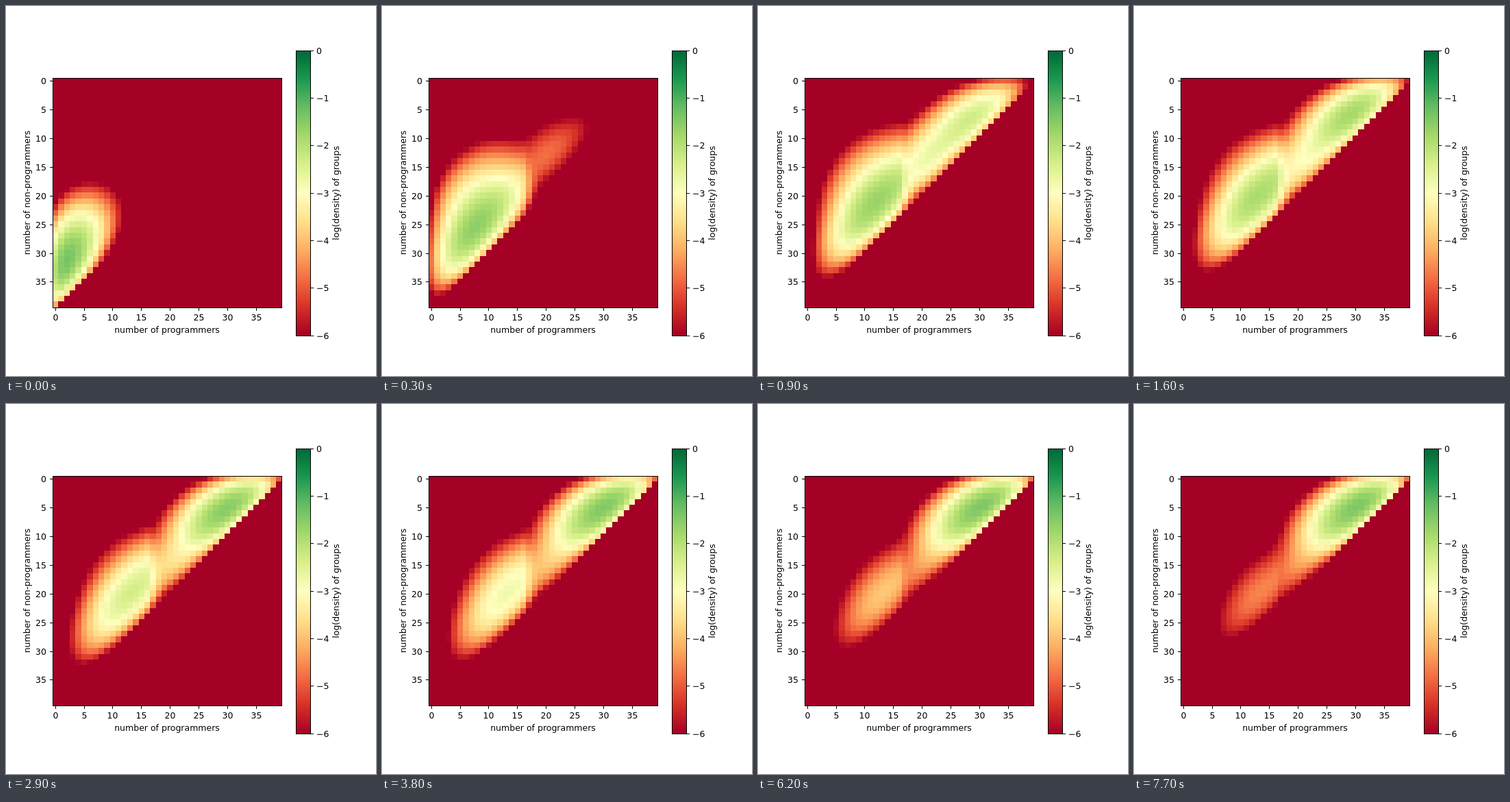
An HTML page with a canvas for the animation above (8000 ms loop, 540 by 540 pixels).

```html
<!DOCTYPE html>
<html>
<head>
<meta charset="utf-8">
<style>
html, body { margin: 0; width: 100%; height: 100%; overflow: hidden; background: #fff; }
canvas { display: block; }
</style>
</head>
<body>
<canvas id="c" width="540" height="540"></canvas>
<script>
const g = document.getElementById('c').getContext('2d');
const N = 39, CELL = 8.37, LOOP = 8000;

// Red-yellow-green colour scale for log densities -6 to 0
const stops = ['a50026', 'd73027', 'f46d43', 'fdae61', 'fee08b', 'ffffbf',
  'd9ef8b', 'a6d96a', '66bd63', '1a9850', '006837'];
const rgb = stops.map(h => [0, 2, 4].map(i => parseInt(h.slice(i, i + 2), 16)));
function color(v) {
  const s = Math.max(0, Math.min(9.999, (v + 6) / 0.6)), i = Math.floor(s);
  return `rgb(${rgb[i].map((a, k) => Math.round(a + (rgb[i + 1][k] - a) * (s - i)))})`;
}

const logFact = [0];
for (let i = 1; i <= N; i++) logFact[i] = logFact[i - 1] + Math.log10(i);

// Multinomial density of groups around a mean composition (mx, my, rest empty)
function cluster(weight, mx, my) {
  const [lx, ly, le] = [mx, my, N - mx - my].map(m => Math.log10(m / N));
  return (x, y, e) => weight * 10 ** (logFact[N] - logFact[x] - logFact[y] - logFact[e]
    + x * lx + y * ly + e * le);
}

// The low cluster settles, then drains over a bridge into the high one
function densityAt(t) {
  const k = Math.exp(-2.4 * t), slow = Math.exp(-0.9 * t), rise = 10 ** (-20 * k ** 3);
  const s = 4 * Math.exp(-1.08 * t), left = s / Math.hypot(1, s);
  const mx = 13.3 - 10.8 * k, my = 19.5 + 11 * k;
  const low = cluster(left, mx, my);
  const loose = cluster(left * (0.3 * k * (1 - k) + 0.008 * (1 - k)), mx * 0.88, my * 0.88);
  const bridge = cluster((0.18 * Math.exp(-t) + 0.002) * rise, 22 - 5 * k, 12.5 + k);
  const high = cluster((1 - left) * rise ** 2, 29.5 - 4 * slow, 5.2 + 4 * slow);
  return (x, y) => {
    const e = N - x - y, cut = 10 ** (-0.45 * Math.max(0, x - 16));
    return Math.log10((low(x, y, e) + loose(x, y, e)) * cut + bridge(x, y, e) + high(x, y, e));
  };
}

const edgeX = i => Math.ceil(67.5 + CELL * i);
const edgeY = i => Math.round(105.05 + CELL * i);

function heatmap(t) {
  const density = densityAt(t);
  g.fillStyle = color(-6);
  g.fillRect(68, 105, 335, 336);
  for (let y = 0; y <= N; y++) {
    for (let x = 0; x + y <= N; x++) {
      g.fillStyle = color(density(x, y));
      g.fillRect(edgeX(x), edgeY(y), edgeX(x + 1) - edgeX(x), edgeY(y + 1) - edgeY(y));
    }
  }
}

function text(s, x, y, align, turn) {
  g.save();
  g.translate(x, y);
  if (turn) g.rotate(-Math.PI / 2);
  g.textAlign = align;
  g.fillText(s, 0, 0);
  g.restore();
}
function line(x1, y1, x2, y2) {
  g.beginPath();
  g.moveTo(x1, y1);
  g.lineTo(x2, y2);
  g.stroke();
}

function axes() {
  g.font = '12.5px "DejaVu Sans", sans-serif';
  g.fillStyle = g.strokeStyle = '#000';
  g.lineWidth = 1;
  g.strokeRect(68.5, 105.5, 334, 335);
  for (let i = 0; i < 40; i += 5) {
    const x = Math.round(71.7 + CELL * i) + 0.5, y = Math.round(109.48 + CELL * i) + 0.5;
    line(x, 441, x, 445);
    text(i, x, 459, 'center');
    line(68, y, 64, y);
    text(i, 59, y + 4.5, 'right');
  }
  text('number of programmers', 235, 477, 'center');
  text('number of non-programmers', 35, 272.5, 'center', true);

  const bar = g.createLinearGradient(0, 481, 0, 65);
  stops.forEach((c, i) => bar.addColorStop(i / 10, '#' + c));
  g.fillStyle = bar;
  g.fillRect(423, 65, 21, 416);
  g.strokeRect(423.5, 65.5, 21, 416);
  g.fillStyle = '#000';
  for (let i = 0; i <= 6; i++) {
    const y = Math.round(64.8 + 69.3 * i) + 0.5;
    line(445, y, 449, y);
    text(i ? '\u2212' + i : '0', 453, y + 4.5, 'left');
  }
  text('log(density) of groups', 486, 273, 'center', true);
}

const start = performance.now();
let shown = -1;
function frame() {
  const t = (performance.now() - start) % LOOP;
  // Steps of 150 ms on a clock of 100 ms ticks
  const step = Math.ceil((Math.floor(t / 100) + 1) / 1.5) - 1;
  if (step !== shown) {
    shown = step;
    g.fillStyle = '#fff';
    g.fillRect(0, 0, 540, 540);
    heatmap(step * 0.15);
    axes();
  }
  requestAnimationFrame(frame);
}
frame();
</script>
</body>
</html>
```
